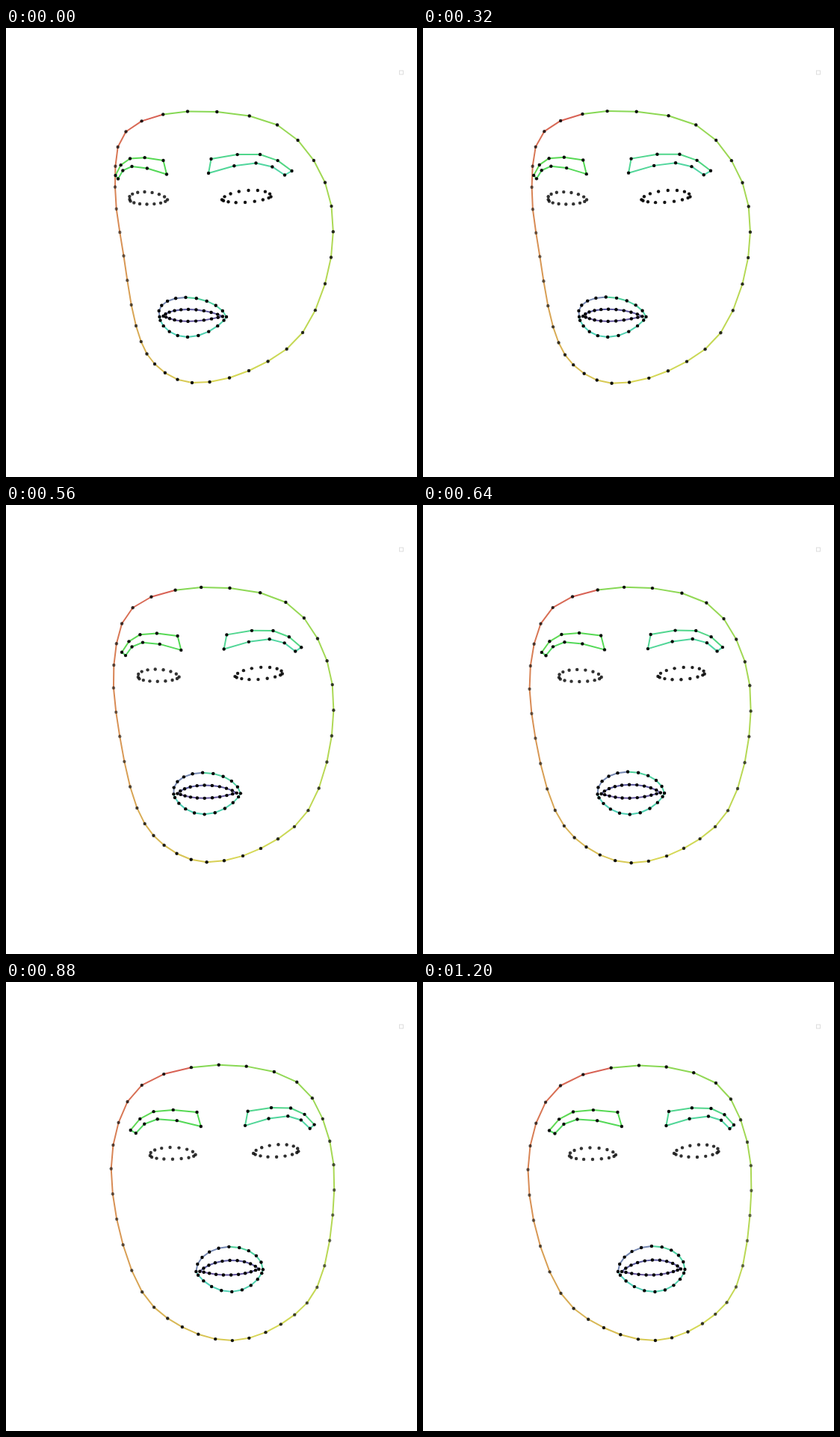
Write an HTML page with a canvas that moves like this. It is 550 px wide and 600 px high and loops after 1.28 s.

```html
<!DOCTYPE html>
<html lang="en">
<head>
<meta charset="utf-8">
<title>Turning face contours</title>
<style>
html, body { margin: 0; width: 100%; height: 100%; overflow: hidden; background: #fff; }
canvas { display: block; }
</style>
</head>
<body>
<canvas id="stage" width="550" height="600"></canvas>
<script>
const ctx = document.getElementById('stage').getContext('2d');
const LOOP = 1280, STEPS = 16;

const range = n => [...Array(n).keys()];
const mix = (a, b, t) => a + (b - a) * t;
const cubicInOut = u => u < 0.5 ? 4 * u ** 3 : 1 - 4 * (1 - u) ** 3;

// Closed Catmull-Rom curve with three points for every key.
function spline(keys) {
  const n = keys.length;
  return range(n * 3).map(i => {
    const k = Math.floor(i / 3), t = i % 3 / 3;
    const [a, b, c, d] = [n - 1, 0, 1, 2].map(o => keys[(k + o) % n]);
    return [0, 1].map(j => b[j] + t / 2 * (c[j] - a[j]
      + t * (2 * a[j] - 5 * b[j] + 4 * c[j] - d[j])
      + t * t * (3 * (b[j] - c[j]) + d[j] - a[j])));
  });
}

// Arch from a over its middle m to b; bunch gathers points at the ends, sharp narrows the arch.
function arch(a, m, b, n, bunch, sharp = 1) {
  return range(n).map(i => {
    const s = i / (n - 1);
    const t = mix(s, (1 - Math.cos(Math.PI * s)) / 2, bunch);
    const rise = Math.sin(Math.PI * s) ** sharp;
    return [0, 1].map(j => mix(a[j], b[j], t) + (m[j] - (a[j] + b[j]) / 2) * rise);
  });
}

// Closed loop of two arches with shared corners.
const loop = (n, bunch, sharp) => ([left, top, right, bottom]) => [
  ...arch(left, top, right, n, bunch).slice(0, -1),
  ...arch(right, bottom, left, n, bunch, sharp).slice(0, -1)
];

const brow = ([a, m, b, c, k, d]) => [...arch(a, m, b, 5, 0), ...arch(c, k, d, 5, 0)];

// How near outline point i lies to point c, from 1 down to 0 a quarter turn away.
const near = (i, c) => Math.max(0, Math.cos((i - c) / 18 * Math.PI)) ** 2;

function outlineColor(i) {
  const k = (i + 1) % 36;
  return `hsl(${98 - 2 * k - 0.018 * k * k},63%,59%)`;
}

// shape turns the key points of the turned and the frontal pose into dots.
// bend spreads them vertically mid-turn, shade is the dot opacity.
const parts = [
  { // outline
    shape: spline,
    from: [[243,111.5], [363,129.5], [427,206.5], [435,306.5], [397,407], [325,458],
      [249,474], [199,449], [174,398], [157.5,304.5], [146,212.5], [160.5,138.5]],
    to: [[289,111.5], [392,135], [434,214], [437.5,312], [419,407.5], [374,456.5],
      [311,479], [242,462], [184.5,416], [148,318.5], [143.5,219], [184,138.5]],
    color: outlineColor,
    bend: 1,
    cheek: i => near(i, 24.5),
    shade: (i, p) => 0.92 - mix(0.4, 0.36, p) * near(i, 27.8) - mix(0.12, 0.4, p) * near(i, 9.8)
  },
  { // left brow
    shape: brow,
    from: [[146.5,197], [166,174.5], [210.5,177], [215,195.5], [168.5,185], [150,201.5]],
    to: [[169,198.5], [201,173.5], [260.5,174], [266,193], [206.5,183.5], [176.5,202.5]],
    color: i => `hsl(${114 + 1.5 * i},64%,59%)`,
    bend: 1, shade: () => 0.92
  },
  { // right brow
    shape: brow,
    from: [[382.5,191], [340,169], [274.5,175], [271,194], [334.5,180.5], [373,196.5]],
    to: [[416,191], [385.5,169], [329,173], [325.5,192], [382,179.5], [410.5,196]],
    color: i => `hsl(${142 + 2 * i},62%,58%)`,
    bend: 1, shade: () => 0.95
  },
  { // left eye
    shape: loop(9, 1, 1),
    from: [[165.5,229], [185.5,219], [216,229.5], [188.5,235.5]],
    to: [[196,232.5], [223.5,221.5], [258,231], [227,237]],
    bend: 0.5, shade: () => 0.8
  },
  { // right eye
    shape: loop(9, 1, 1.4),
    from: [[289,229.5], [324.5,217], [354.5,225.5], [320,233]],
    to: [[336,229], [369,217.5], [395.5,226.5], [367,234]],
    bend: 0.5, shade: (i, p) => 0.93 - 0.12 * p
  },
  { // outer lips
    shape: loop(11, 1, 1.5),
    from: [[205.5,386], [240.5,360], [295,386], [243,413]],
    to: [[261,387], [306,353], [350.5,384], [310.5,414]],
    color: i => i < 5 ? 'hsl(222,28%,58%)' : `hsl(${150 + 1.1 * i},58%,56%)`,
    bend: 0, shade: () => 1
  },
  { // inner lips
    shape: loop(11, 0.5, 1.4),
    from: [[210.5,385], [244,376], [290,385.5], [243.5,392]],
    to: [[266,387], [307,371.5], [345,383.5], [309,391.5]],
    color: i => `hsl(${238 + i},28%,48%)`,
    bend: 0, shade: () => 1
  }
].map(part => ({ cheek: () => 0, ...part, from: part.shape(part.from), to: part.shape(part.to) }));

// The upper head leads the chin a little, and the left cheek swells mid-turn.
function place({ from, to, bend, cheek }, p) {
  const arc = p * (1 - p);
  return from.map(([x, y], i) => [
    mix(x, to[i][0], p + (414 - y) * 0.0009 * arc) - 10 * cheek(i) * arc,
    mix(y, to[i][1], p) + bend * 0.037 * (y - 290) * arc
  ]);
}

function drawPart(part, p) {
  const points = place(part, p);
  if (part.color) points.forEach((a, i) => {
    ctx.strokeStyle = part.color(i);
    ctx.beginPath();
    ctx.moveTo(...a);
    ctx.lineTo(...points[(i + 1) % points.length]);
    ctx.stroke();
  });
  points.forEach(([x, y], i) => {
    ctx.fillStyle = `rgba(0,0,0,${part.shade(i, p)})`;
    ctx.beginPath();
    ctx.arc(x, y, 2.2, 0, 2 * Math.PI);
    ctx.fill();
  });
}

function draw(time) {
  const p = cubicInOut(Math.floor(time % LOOP / LOOP * STEPS) / STEPS);
  ctx.fillStyle = '#fff';
  ctx.fillRect(0, 0, 550, 600);
  ctx.lineWidth = 1;
  ctx.strokeStyle = '#ddd';
  ctx.strokeRect(526.5, 57, 5, 5);
  ctx.lineWidth = 2;
  ctx.lineCap = 'round';
  parts.forEach(part => drawPart(part, p));
}

const start = performance.now();
function tick() {
  draw(performance.now() - start);
  requestAnimationFrame(tick);
}
tick();
</script>
</body>
</html>
```
